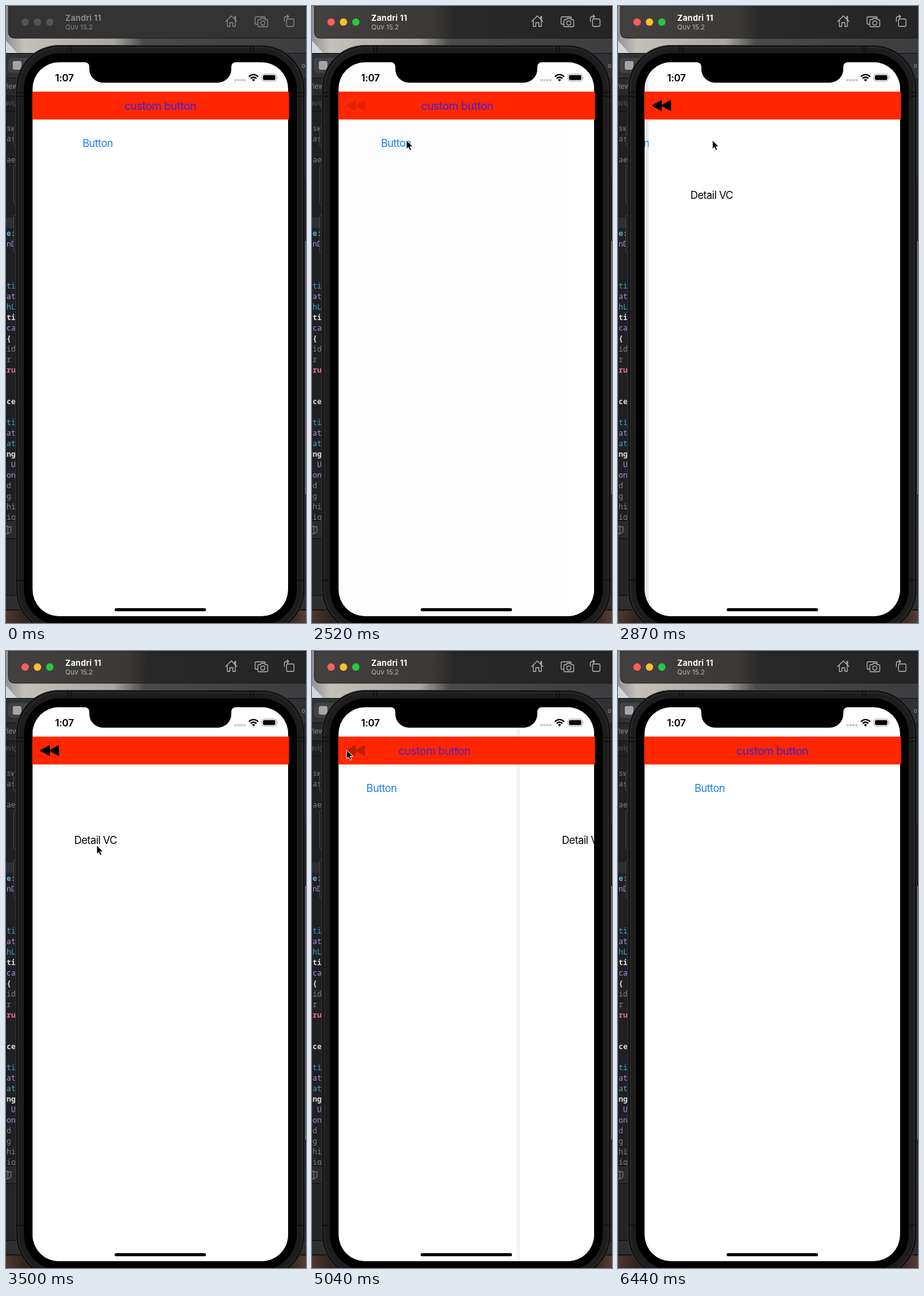
Animation, 486 px wide and 998 px high, one loop 6650 ms. Source, as an HTML page:

```html
<!DOCTYPE html>
<html lang="en">
<head>
<meta charset="utf-8">
<title>Navigation demo</title>
<style>
  html, body { margin: 0; width: 100%; height: 100%; overflow: hidden; background: #1f2023; }
  svg { display: block; width: 100vw; height: 100vh; }
  text { font-family: Inter, "Open Sans", sans-serif; }
  .code text { font: 12px "Noto Sans Mono", "DejaVu Sans Mono", monospace; white-space: pre; }
  .label { font-size: 17px; letter-spacing: -.55px; text-anchor: middle; }
  .icons { fill: none; stroke-width: 1.3; stroke-linejoin: round; stroke-linecap: round; }
</style>
</head>
<body>
<svg viewBox="0 0 486 998" preserveAspectRatio="none">
  <defs>
    <clipPath id="screen"><rect x="43" y="91" width="414" height="896" rx="43"/></clipPath>
    <clipPath id="bar"><rect x="43" y="139" width="414" height="44"/></clipPath>
    <linearGradient id="wall">
      <stop offset="0" stop-color="#8f9096"/><stop offset=".06" stop-color="#c4c0ba"/>
      <stop offset=".36" stop-color="#a9a5a0"/><stop offset=".46" stop-color="#4a4a49"/>
      <stop offset="1" stop-color="#3c3d3e"/>
    </linearGradient>
    <linearGradient id="active">
      <stop offset="0" stop-color="#43413f"/><stop offset=".4" stop-color="#3b3937"/>
      <stop offset=".47" stop-color="#292828"/><stop offset="1" stop-color="#252525"/>
    </linearGradient>
    <linearGradient id="floor">
      <stop offset="0" stop-color="#4c3830"/><stop offset=".06" stop-color="#30241f"/>
      <stop offset=".95" stop-color="#33261f"/><stop offset="1" stop-color="#573f36"/>
    </linearGradient>
  </defs>

  <!-- desktop and editor -->
  <rect width="486" height="80" fill="url(#wall)"/>
  <path d="M0 56L18 76H0z" fill="#cfd8e0"/>
  <rect y="76" width="486" height="902" fill="#1f2024"/>
  <rect y="77" width="486" height="40" fill="#303135"/>
  <path d="M0 76.5H486" stroke="#111"/>
  <rect x="3" y="84" width="40" height="24" rx="5" fill="#414246"/>
  <rect x="11" y="89" width="14" height="14" rx="3" fill="#a5a5a8"/>
  <rect y="117" width="20" height="28" fill="#28292d"/>
  <path d="M0 116.500H18M0 145.500H18M0 170.500H18" stroke="#101113"/>
  <rect y="342" width="16" height="17" fill="#2d2f36"/>
  <g class="code" id="code"></g>
  <text x="-6" y="134" font-size="11" fill="#8d8e92">View</text>
  <text x="-3" y="161" font-size="11" fill="#55565a">avig</text>
  <rect y="832" width="486" height="30" fill="#292a2d"/>
  <path d="M0 832.500H486M0 861.500H486" stroke="#0c0c0d"/>
  <path d="M-2 843L3 841V853L-2 855M3 843L8 842V851L3 854" fill="none" stroke="#8b8c90"/>
  <rect y="862" width="486" height="91" fill="#242528"/>
  <rect y="953" width="486" height="24" fill="#2d2e31"/>
  <path d="M0 953.500H486M0 976.500H486" stroke="#0d0d0e"/>
  <rect y="978" width="486" height="20" fill="url(#floor)"/>
  <text x="479" y="100" font-size="10" fill="#96979a">o</text>
  <path d="M485.500 380V790" stroke="#8a8a8a"/>
  <path d="M485 278V380" stroke="#111" stroke-width="3"/>

  <!-- simulator title bar -->
  <path id="title" d="M4 0H486V52H14Q4 52 4 42z" stroke="#171717"/>
  <g id="lights"><circle cx="31" cy="26" r="6"/><circle cx="51" cy="26" r="6"/><circle cx="71" cy="26" r="6"/></g>
  <text id="device" x="96" y="24" font-size="13" font-weight="700" letter-spacing=".3">Zandri 11</text>
  <text id="system" x="96" y="38" font-size="11">Quv 15.2</text>
  <g class="icons" id="icons">
    <path d="M356 25L365 16L374 25M358.500 23V33H362.500V27H367.500V33H371.500V23M370.500 21V17H372V22"/>
    <path d="M407 29.500H405.500Q403.500 29.500 403.500 27.500V19.500Q403.500 17.500 405.500 17.500H418Q420 17.500 420 19.500"/>
    <path d="M409.500 22H412L413.500 20H418.500L420 22H422Q424 22 424 24V31.500Q424 33.500 422 33.500H410Q408 33.500 408 31.500V24Q408 22 409.500 22z"/>
    <circle cx="416" cy="27.500" r="3.300"/>
    <rect x="454.500" y="21" width="12" height="12" rx="2"/>
    <path d="M451 25V20Q451 17 454 17H458M455.500 14.500L458 17L455.500 19.500"/>
  </g>

  <!-- phone body -->
  <g fill="#1f1f20" stroke="#47484a">
    <rect x="12.500" y="194.500" width="8" height="32" rx="2"/>
    <rect x="12.500" y="257.500" width="8" height="62" rx="2"/>
    <rect x="12.500" y="338.500" width="8" height="61" rx="2"/>
  </g>
  <rect x="16" y="63.500" width="468" height="951" rx="70" fill="#111" stroke="#3b3b3c"/>
  <rect x="20" y="67" width="460" height="944" rx="67" fill="#1d1d1e" stroke="#292929" stroke-width="2"/>
  <path d="M100 64V75M105 64V75M396 64V75M401 64V75M16 140H28M16 146H28M472 140H484M472 146H484M16 929H28M472 929H484" stroke="#0c0c0c" stroke-width="1.500"/>
  <rect x="29" y="76.500" width="442" height="925" rx="58" fill="#000"/>

  <!-- app screen -->
  <g clip-path="url(#screen)">
    <rect x="43" y="91" width="414" height="896" fill="#fff"/>
    <g id="home"><text class="label" x="148.500" y="228" fill="#1a80ec">Button</text></g>
    <rect id="dim" x="43" y="91" width="414" height="896"/>
    <g id="detail">
      <rect id="edge" x="37" y="91" width="6" height="896" fill="#f3f3f4"/>
      <rect x="43" y="91" width="414" height="896" fill="#fff"/>
      <text class="label" x="145" y="312" fill="#050505">Detail VC</text>
    </g>
    <path d="M128 90V91A7 7 0 0 1 135 98V102A22 22 0 0 0 157 124H343A22 22 0 0 0 365 102V98A7 7 0 0 1 372 91V90z"/>
    <text x="94.500" y="122" font-size="16" font-weight="600" letter-spacing="-.3" text-anchor="middle">1:07</text>
    <path d="M370 120H388" stroke="#c6c6c8" stroke-width="3.600" stroke-dasharray="3.600 1.200"/>
    <g fill="none" stroke="#000" stroke-width="2.300">
      <path d="M393.500 114.300Q401 107.500 408.500 114.300M396.300 117.200Q401 113.200 405.700 117.200"/>
    </g>
    <path d="M398.300 119.200Q401 117.200 403.700 119.200L401 122z"/>
    <rect x="414.500" y="110" width="23.500" height="11.500" rx="3.500" fill="none" stroke="#a3a3a5"/>
    <rect x="416.300" y="111.800" width="20" height="8" rx="2"/>
    <path d="M439.300 113.800Q441.300 115.700 439.300 117.700z" fill="#a3a3a5"/>
    <rect x="176" y="974" width="148" height="5" rx="2.500"/>
  </g>

  <!-- navigation bar -->
  <rect x="42.500" y="138.500" width="416" height="45" fill="#ff2600"/>
  <g clip-path="url(#bar)">
    <text id="heading" x="250" y="167.500" font-size="18" letter-spacing="-.45" text-anchor="middle" fill="#3d22d6">custom button</text>
    <path id="back" d="M56.500 161L69.800 153.600V168.400zM71.500 161L84.800 153.600V168.400z" stroke="#000" stroke-width="2.200" stroke-linejoin="round"/>
  </g>

  <path id="cursor" d="M0 0V14.500L3.300 11.500L5.500 16.700L8 15.600L5.800 10.500H10.300z" stroke="#fff" stroke-linejoin="round"/>
</svg>

<script>
const $ = id => document.getElementById(id);
const LOOP = 6650, TICK = 70;
const FOCUS = 2450, PUSH = 2511, PRESS = 4760, POP = 4932;
const WIDTH = 414, PARALLAX = WIDTH * .3;

// time, x, y of the pointer tip
const track = [
  [1540, 237, 947], [1960, 156, 206], [2170, 156, 206], [2240, 145, 212],
  [2310, 153, 217], [3080, 153, 217], [3500, 147, 314], [3850, 147, 314],
  [4200, 326, 262], [4550, 38, 171], [4690, 56, 160], [5250, 56, 160],
  [5600, 178, 283], [6300, 254, 986], [6440, 255, 994]
];

// visible ends of the editor lines: baseline, colour, text
const inks = { g: '#7f8087', w: '#dcdcde', c: '#43a9c2', p: '#ad90dc', k: '#e5689a', b: '#57b5dc' };
const lines = `202 g sw|219 g as|253 g ae|372 b e:|389 p nD|457 c ti|474 p at|491 c hL|508 w ti|525 p ca|542 w {|559 g id|576 g r|593 k ru|644 w ce|678 c ti|695 p at|712 c at|729 w ng|746 p  U|763 p on|780 g d|797 g g|814 g hi|831 g ig`;
$('code').innerHTML = lines.split('|').map(line => {
  const [, y, ink, word] = line.match(/^(\d+) (\w) (.*)$/);
  const weight = 'wbk'.includes(ink) ? 700 : 500;
  return `<text x="1" y="${y}" fill="${inks[ink]}" style="font-weight:${weight}">${word}</text>`;
}).join('');

const clamp = v => Math.max(0, Math.min(1, v));
const settle = ms => ms <= 0 ? 0 : 1 - Math.exp(-ms / 87);
const smooth = u => u * u * (3 - 2 * u);
const shift = (id, x, y = 0) => $(id).setAttribute('transform', `translate(${x} ${y})`);
const paint = (id, name, value) => $(id).setAttribute(name, value);

function pointer(t) {
  const next = track.findIndex(key => key[0] > t);
  if (next < 1) return null;
  const [t0, x0, y0] = track[next - 1], [t1, x1, y1] = track[next];
  const u = smooth((t - t0) / (t1 - t0));
  return [x0 + (x1 - x0) * u, y0 + (y1 - y0) * u];
}

function drawWindow(focused) {
  paint('title', 'fill', focused ? 'url(#active)' : '#343333');
  paint('device', 'fill', focused ? '#fff' : '#8b8989');
  paint('system', 'fill', focused ? '#b5b4b3' : '#858383');
  paint('icons', 'stroke', focused ? '#b5b4b2' : '#8b8988');
  const colours = focused ? ['#ff5f57', '#febc2e', '#28c840'] : ['#555353', '#555353', '#555353'];
  [...$('lights').children].forEach((dot, i) => dot.setAttribute('fill', colours[i]));
}

function draw(t) {
  const popping = t > POP;
  const depth = popping ? 1 - settle(t - POP) : settle(t - PUSH);

  drawWindow(t >= FOCUS);
  shift('home', -PARALLAX * depth);
  shift('detail', WIDTH * (1 - depth));
  paint('detail', 'visibility', depth > .0012 ? 'visible' : 'hidden');
  paint('edge', 'opacity', popping ? 1 : 0);
  paint('dim', 'opacity', popping ? 0 : depth * .092);

  shift('heading', -(popping ? 179 : 151) * depth);
  paint('heading', 'opacity', 1 - depth ** 1.8);
  const pressed = .25 * clamp(1 - (t - 5040) / 210);
  paint('back', 'opacity', t >= PRESS ? pressed : clamp(depth * 1.2));

  const tip = pointer(t);
  paint('cursor', 'visibility', tip ? 'visible' : 'hidden');
  if (tip) shift('cursor', ...tip);
}

const start = performance.now();
function frame() {
  const t = (performance.now() - start) % LOOP;
  draw(Math.floor(t / TICK) * TICK);
  requestAnimationFrame(frame);
}
frame();
</script>
</body>
</html>
```
